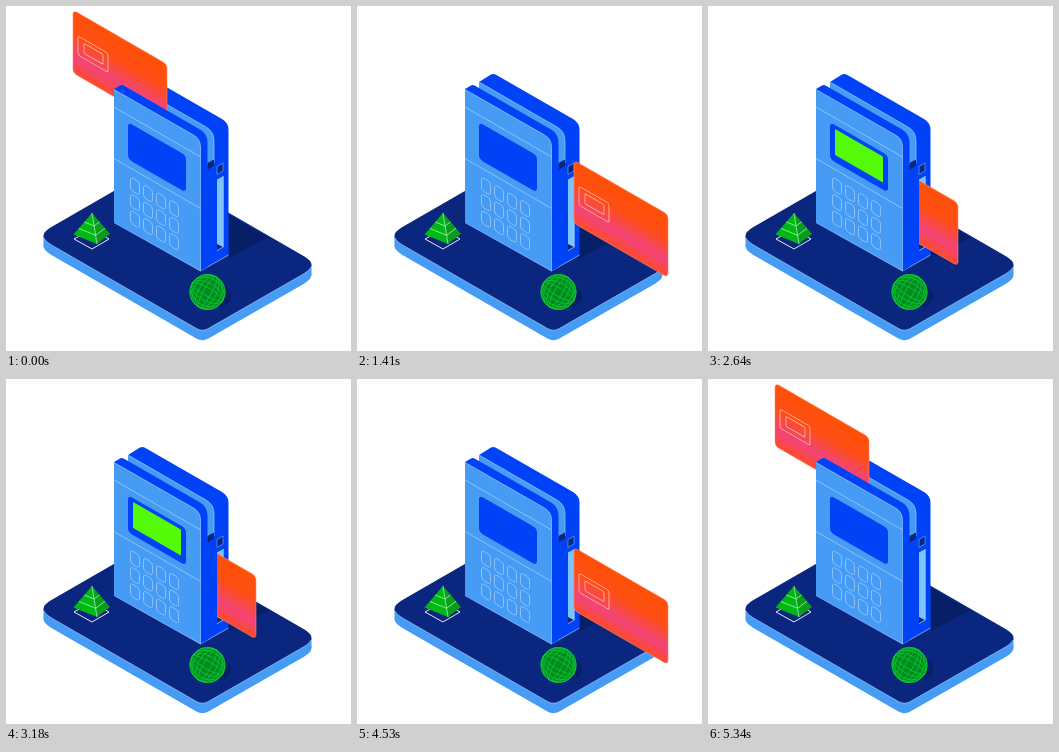
Recreate the animation shown at these times as an HTML page. Size 345x345 px, loop 6 s.

```html
<!DOCTYPE html>
<html lang="en">
<head>
<meta charset="utf-8">
<title>Card terminal</title>
<style>
  html, body { margin: 0; width: 100%; height: 100%; overflow: hidden; background: #fff; }
  svg { display: block; width: 100vw; height: 100vh; }
  .blue { fill: #0042f5; }
  .light { fill: #469bf4; }
  .navy { fill: #0a267f; }
  .line { fill: none; stroke: #9dcbff; stroke-width: .7; }
  .grid { fill: none; stroke: #12c838; stroke-width: .7; }
  .chip { fill: none; stroke: #ffc0a4; stroke-width: .8; }
</style>
</head>
<body>
<svg viewBox="0 0 345 345">
  <defs>
    <linearGradient id="heat" x2="0" y2="1">
      <stop stop-color="#ff5008"/>
      <stop offset=".38" stop-color="#ff4e14"/>
      <stop offset=".74" stop-color="#f2447a"/>
      <stop offset="1" stop-color="#ff4a28"/>
    </linearGradient>
    <clipPath id="opening"><rect id="visible" width="345" height="345"/></clipPath>
    <path id="slab" d="M45 221.3 146.4 162.8 298 250.3Q313 259 298 267.7L202.4 322.5Q196.4 326 190.4 322.5L45 238.7Q30 230 45 221.3Z"/>
  </defs>

  <!-- base -->
  <use href="#slab" y="10" class="light"/>
  <path class="light" d="M37.5 230V240L305.500 269V259Z"/>
  <use href="#slab" class="navy"/>
  <path class="line" d="M38 232Q39 235.200 45 238.700L190.400 322.500Q196.400 326 202.400 322.500L298 267.700Q304 264 305 261"/>
  <path fill="#071f66" d="M223 209 262 231.500 223 252Z"/>
  <ellipse cx="213" cy="290" rx="12" ry="11" fill="#071f66"/>

  <!-- pyramid -->
  <path fill="none" stroke="#fff" stroke-width=".9" d="M68 233 85.500 223 103 233 86 243Z"/>
  <path fill="#00b814" d="M86 207 67.500 228.500 91 238Z"/>
  <path fill="#0a9c1c" d="M86 207 104 228 91 238Z"/>
  <path fill="none" stroke="#a8f5b0" stroke-width=".8" d="M78.400 216 88 220 93.500 216M73 222.500 89.600 229.300 99 222.300M86 207 91 238"/>

  <!-- globe -->
  <g id="globe" transform="translate(201.500 286) rotate(30)">
    <circle r="17.500" fill="#008c1e"/>
  </g>

  <!-- rear half of the terminal -->
  <path class="blue" d="M122 76 134 68.600Q136 67.300 138.500 68.500L216 113Q222.500 116.800 222.500 124V249L195 265V140L122 100Z"/>
  <path class="light" d="M122 76 200.500 121.300Q208 125.800 208 135V157L195 160 122 110Z"/>
  <path class="line" d="M122 76 200.500 121.300Q208 125.800 208 135V157"/>
  <path class="blue" d="M194 167 208 159V257L194 265Z"/>
  <path class="navy" d="M201.500 157 208 153.500V160L201.500 163.500Z"/>
  <path class="navy" stroke="#5fa8ff" stroke-width=".7" d="M211 160.500 217 157V165L211 168.500Z"/>
  <path fill="#7cc4fb" d="M211 173.500 217.300 170V241L211 244.500Z"/>
  <path class="navy" d="M211 238 217 241 211 244.500Z"/>
  <path class="line" d="M217.300 170V241L211 244.700M194.500 265 222.500 249"/>

  <g clip-path="url(#opening)">
    <g id="card">
      <rect width="94" height="63" rx="4" fill="url(#heat)" stroke="#ff8a66" stroke-width=".5"/>
      <rect class="chip" x="5" y="23" width="30" height="19" rx="2"/>
      <rect class="chip" x="11" y="27" width="19" height="10" rx="1"/>
    </g>
  </g>

  <!-- front half of the terminal -->
  <path class="blue" d="M108 83 114.500 79.300Q116 78.500 118 79.700L194.500 123.800Q201.500 128 201.500 137V261L194.500 265 108 217Z"/>
  <path class="light" d="M108 83.500 187.500 129Q194.500 133 194.500 141V265L109 216.800Q108 216 108 215Z"/>
  <path class="line" d="M108 83.500 187.500 129Q194.500 133 194.500 141V265L108 216.500"/>
  <g id="face" transform="matrix(1 .577 0 1 108 82)">
    <path class="line" d="M0 19H86.500M0 70.500H86.500"/>
    <rect class="blue" x="14" y="26" width="58" height="37" rx="4"/>
    <rect id="screen" x="19" y="30" width="48" height="26" rx="1" fill="#55fa08"/>
  </g>
</svg>
<script>
const $ = id => document.getElementById(id);

function add(parent, tag, attrs) {
  const el = document.createElementNS('http://www.w3.org/2000/svg', tag);
  for (const key in attrs) el.setAttribute(key, attrs[key]);
  $(parent).append(el);
}

for (let i = 0; i < 12; i++) {
  add('face', 'rect', {
    class: 'line', x: 16.5 + i % 4 * 13, y: 79.5 + Math.floor(i / 4) * 16.5,
    width: 9, height: 13, rx: 3
  });
}
for (const r of [4, 9, 14, 17.5]) {
  add('globe', 'ellipse', { class: 'grid', rx: r, ry: 17.5 });
  add('globe', 'ellipse', { class: 'grid', rx: 17.5, ry: r });
}

const LOOP = 6000, STEP = 30, MOVE = 1350;
// Swipe through the top slot, drop beside the reader, push into the side slot.
const route = [[67, 4], [217, 90.6], [217, 178], [156, 142.8]];
const legs = route.slice(1).map(([x, y], i) => Math.hypot(x - route[i][0], y - route[i][1]));
const total = legs.reduce((a, b) => a + b);
const ramp = (t, start) => Math.min(1, Math.max(0, (t - start) / MOVE));

function draw(time) {
  const t = Math.floor(time % LOOP / STEP) * STEP;
  let way = total * (1 - (1 - ramp(t, 675)) ** 1.6 - ramp(t, 3990) ** 1.55);
  let leg = 0;
  while (leg < legs.length - 1 && way > legs[leg]) way -= legs[leg++];
  const [x, y] = [0, 1].map(k =>
    route[leg][k] + (route[leg + 1][k] - route[leg][k]) * way / legs[leg]);

  $('card').setAttribute('transform', `matrix(1 .577 0 1 ${x} ${y})`);
  $('visible').setAttribute('x', leg ? 211 : 0);
  $('screen').style.display = t >= 2280 && t < 3720 ? '' : 'none';
}

const start = performance.now();
function tick() {
  draw(performance.now() - start);
  requestAnimationFrame(tick);
}
tick();
</script>
</body>
</html>
```
